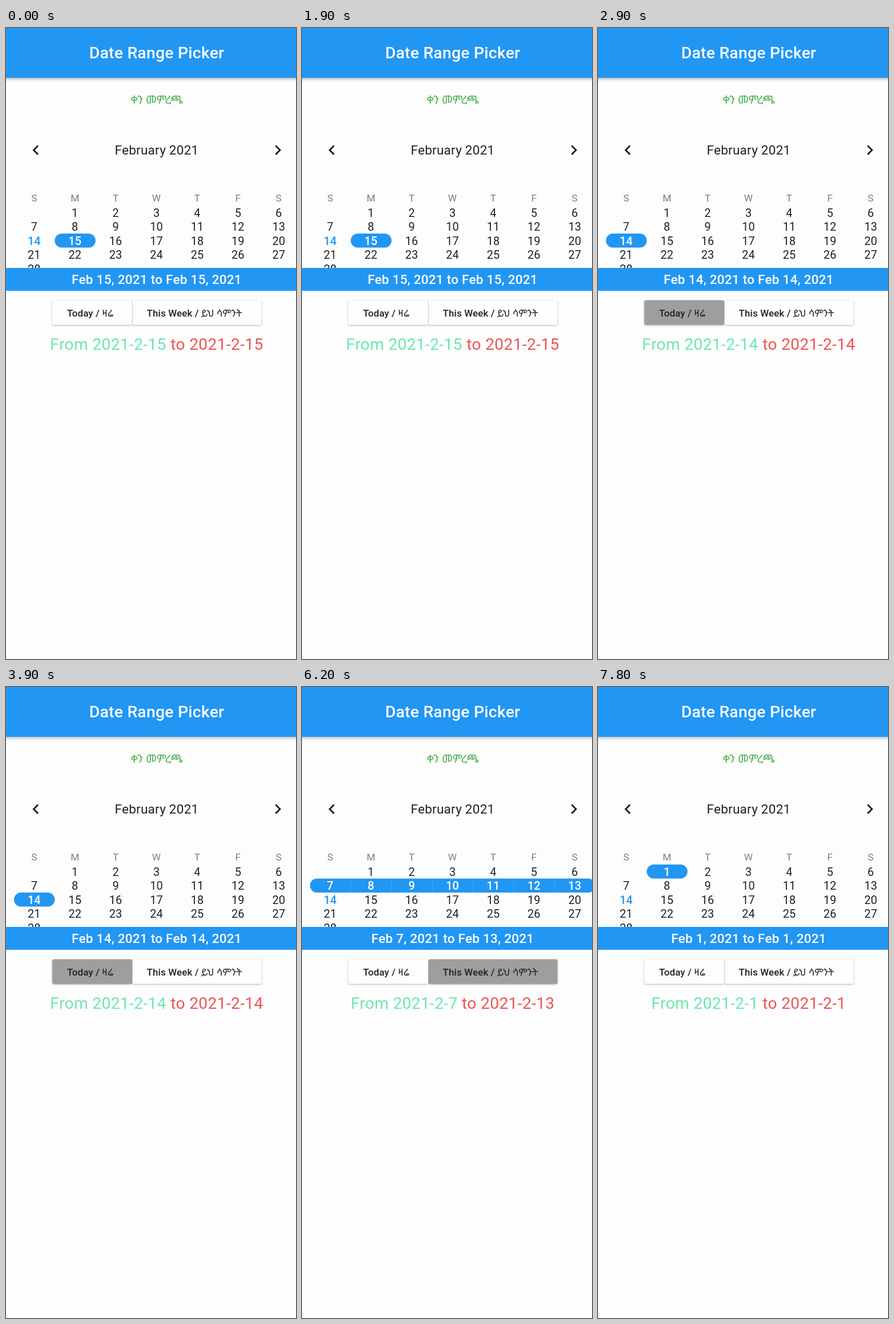
An HTML page for the animation above (8 s loop, 508 px wide and 1102 px high).

```html
<!DOCTYPE html>
<html lang="en">
<head>
<meta charset="utf-8">
<title>Date Range Picker</title>
<style>
  html, body { margin: 0; width: 100%; height: 100%; overflow: hidden; background: #fdfdfd; }
  svg { display: block; width: 508px; height: 1102px; }
  text { font-family: Roboto, "Noto Sans Ethiopic", "Noto Sans", sans-serif; fill: #212121; white-space: pre; }
  .mid { text-anchor: middle; }
  .medium { font-weight: 500; }
  .app-bar { filter: drop-shadow(0 2px 3px rgba(0, 0, 0, .3)); }
  .button { filter: drop-shadow(0 1.5px 1.5px rgba(0, 0, 0, .3)); }
</style>
</head>
<body>
<svg viewBox="0 0 508 1102">
  <rect class="app-bar" x="-10" y="-10" width="548" height="97" fill="#2196f3"/>
  <text class="mid medium" x="264" y="53" font-size="28.4" letter-spacing=".21" style="fill:#fff">Date Range Picker</text>
  <text class="mid" x="264" y="132" font-size="19.8" style="fill:#4caf50">ቀን መምረጫ</text>

  <path transform="translate(34.8 195.8) scale(1.45)" fill="#212121" d="M15.41 7.41L14 6l-6 6 6 6 1.41-1.41L10.83 12z"/>
  <path transform="translate(458.8 195.8) scale(1.45)" fill="#212121" d="M10 6L8.59 7.41 13.17 12l-4.58 4.59L10 18l6-6z"/>
  <text class="mid" x="264" y="221" font-size="22.6" letter-spacing=".21">February 2021</text>

  <g id="calendar"></g>

  <rect y="419" width="508" height="40" fill="#2196f3"/>
  <text id="summary" class="mid medium" x="264" y="446.5" font-size="22.6" letter-spacing=".21" style="fill:#fff"></text>

  <g class="button">
    <rect id="today" x="81" y="475.5" width="140" height="43" rx="3"/>
    <rect id="week" x="221.5" y="475.5" width="226" height="43" rx="3"/>
  </g>
  <path d="M221.2 477v40" stroke="#000" stroke-opacity=".1"/>
  <g class="medium" font-size="17" letter-spacing=".1">
    <text x="107" y="504">Today / ዛሬ</text>
    <text x="246.5" y="504">This Week / ይህ ሳምንት</text>
  </g>

  <text class="mid" x="264" y="562" font-size="28.22" letter-spacing=".32"><tspan id="from" fill="#6ae8ae"></tspan><tspan id="to" fill="#f05252"></tspan></text>
</svg>
<script>
const LOOP = 8000, BLUE = '#2196f3', TODAY = 14;
const LEFT = 14, CELL = 71.4, TOP = 310, ROW = 24.5;
const selections = [
  { at: 0, first: 15, last: 15 },
  { at: 2600, first: 14, last: 14, button: 'today' },
  { at: 5200, first: 7, last: 13, button: 'week' },
  { at: 7800, first: 1, last: 1 },
];
const byId = id => document.getElementById(id);
const column = day => day % 7;
const rowTop = day => TOP + Math.floor(day / 7) * ROW;

function label(text, col, y, size, color, weight = 400) {
  const x = LEFT - .4 + (col + .5) * CELL;
  return `<text class="mid" x="${x}" y="${y}" font-size="${size}" font-weight="${weight}" style="fill:${color}">${text}</text>`;
}

// The month starts on a Monday, so day 0 would be the first Sunday cell.
function calendar({ first, last }) {
  const x = LEFT + column(first) * CELL;
  const y = rowTop(first);
  const count = last - first + 1;
  let out = [...'SMTWTFS'].map((name, col) => label(name, col, 303, 17.3, '#808080')).join('');
  out += `<rect x="${x}" y="${y}" width="${count * CELL}" height="${ROW}" rx="12.2" fill="${BLUE}"/>`;
  for (let i = 1; i < count; i++)
    out += `<path d="M${x + i * CELL} ${y}v${ROW}" stroke="#fff" stroke-opacity=".16"/>`;
  for (let day = 1; day <= 28; day++) {
    const selected = day >= first && day <= last;
    const color = selected ? '#fff' : day === TODAY ? BLUE : '#212121';
    out += label(day, column(day), rowTop(day) + 19.6, 20, color, selected || day === TODAY ? 500 : 400);
  }
  return out;
}

function show(selection) {
  const { first, last, button } = selection;
  byId('calendar').innerHTML = calendar(selection);
  byId('summary').textContent = `Feb ${first}, 2021 to Feb ${last}, 2021`;
  byId('from').textContent = `From 2021-2-${first} `;
  byId('to').textContent = `to 2021-2-${last}`;
  for (const id of ['today', 'week'])
    byId(id).setAttribute('fill', id === button ? '#9e9e9e' : '#fefefe');
}

// CSS for text sets a default fill; coloured spans need it inline.
for (const id of ['from', 'to']) byId(id).style.fill = byId(id).getAttribute('fill');

let current;
function frame() {
  const time = performance.now() % LOOP;
  const selection = selections.findLast(s => s.at <= time);
  if (selection !== current) show(current = selection);
  requestAnimationFrame(frame);
}
frame();
</script>
</body>
</html>
```
